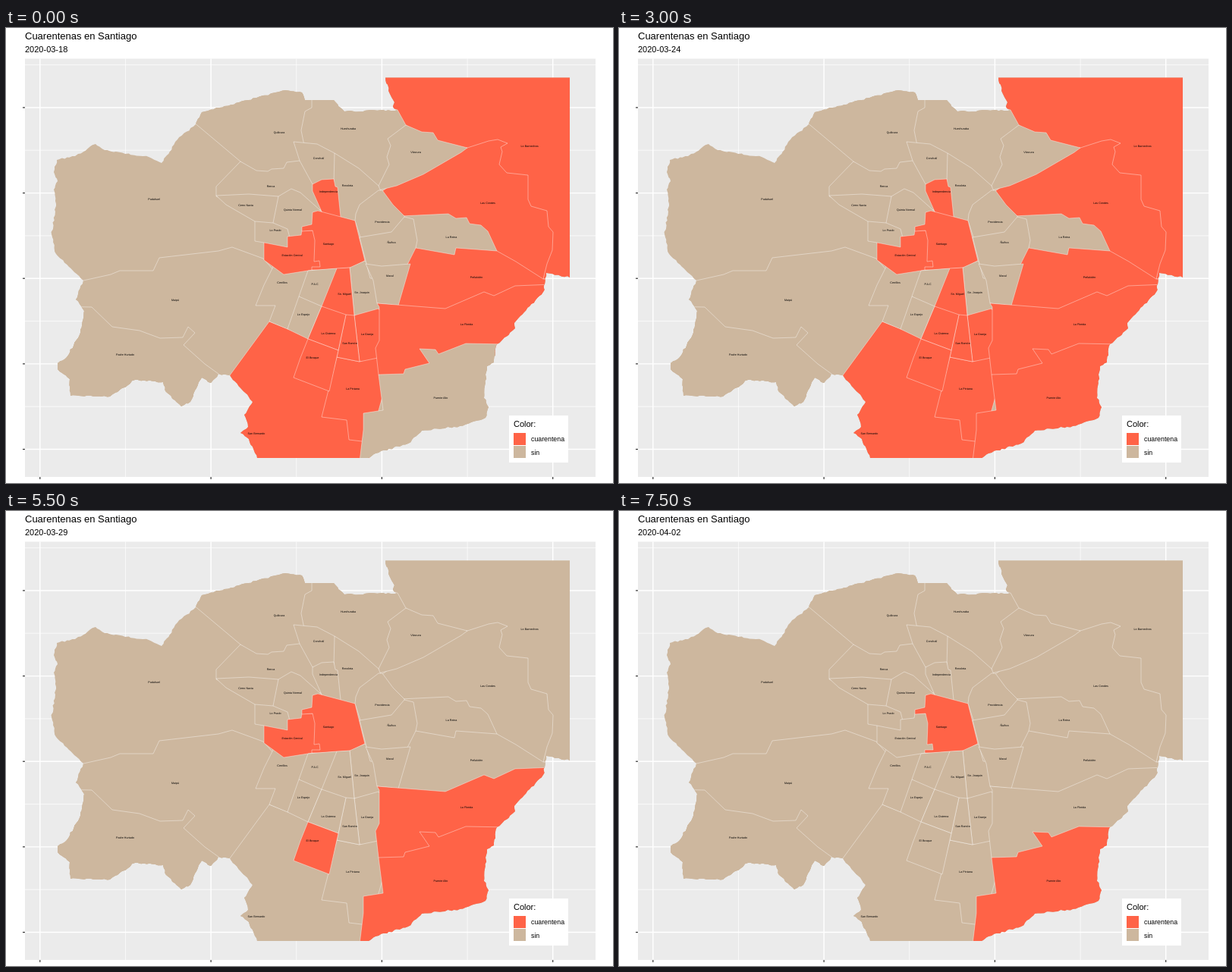
Recreate the animation shown at these times as an HTML page. Size 800 by 600 pixels, loop 8000 ms.

```html
<!DOCTYPE html>
<html lang="es">
<head>
<meta charset="utf-8">
<title>Cuarentenas en Santiago</title>
<style>
html, body { margin: 0; width: 100%; height: 100%; overflow: hidden; background: #fff; }
svg { display: block; width: 800px; height: 600px; }
text { font-family: "Liberation Sans", Arial, sans-serif; }
#map { clip-path: url(#land); stroke: #fff; stroke-width: .4; }
#labels { font-size: 3.7px; text-anchor: middle; text-rendering: geometricPrecision; }
</style>
</head>
<body>
<svg viewBox="0 0 800 600">
  <clipPath id="land"></clipPath>
  <rect x="25" y="40.5" width="752" height="551.5" fill="#ebebeb"/>
  <g id="grid"></g>
  <g id="map"></g>
  <g id="labels"></g>
  <text x="25" y="15" font-size="13">Cuarentenas en Santiago</text>
  <text id="date" x="25" y="32" font-size="11"></text>
  <rect x="663" y="511" width="78" height="62" fill="#fff"/>
  <text x="669" y="526" font-size="11">Color:</text>
  <rect x="669" y="534" width="16" height="16" fill="#ff6347"/>
  <rect x="669" y="551" width="16" height="16" fill="#cdb79e"/>
  <text x="692" y="545" font-size="8.8">cuarentena</text>
  <text x="692" y="563" font-size="8.8">sin</text>
</svg>
<script>
// Key points of the outer edge; roughen() adds the fine wiggles.
const coast = `250,127 258,111 368,82 390,85 394,95 432,95 446,110 516,108 510,104 512,98 507,89 500,65.5
743,65.5 743,329 712,323 708,348 690,367 670,389 671,396 647,417 643,441 634,446 630,488 636,500 632,514
598,525 548,531 530,548 487,561 478,567 331,567 320,542 309,534 319,526 314,510 325,493 312,478 295,458
280,456 270,468 258,461 243,493 231,499 211,480 207,467 170,464 137,486 85,485 84,463 68,450 68,442
80,434 98,402 103,373 92,358 102,333 66,298 60,272 66,232 63,213 68,202 63,190 67,174 91,169 118,153
130,161 188,170 205,178 226,147`;

// name | label position | phases under quarantine | outline
// Each border is drawn by the later commune; the rest runs loosely beneath neighbours or past the coast.
const communes = `
Pudahuel|195,226||0,0 800,0 800,600 0,600
Maipú|223,359||80,335 102,333 138,325 150,320 194,320 202,303 280,294 298,289 339,304 380,350 380,480 80,480
Padre Hurtado|157,431||50,367 113,368 140,394 176,399 203,409 233,408 240,394 249,402 234,418 262,443 280,456 280,510 50,510
San Bernardo|330,535|AB|295,458 347,387 480,440 480,590 280,590
Quilicura|360,138||240,118 309,176 340,205 390,200 420,150 420,60 240,60
Huechuraba|451,133||392,150 389,135 394,110 403,105 403,80 540,80 540,140 510,215 460,230 400,170
Lo Barnechea|690,156|AB|490,60 760,60 760,331 690,331 600,180 527,128 516,108 500,104
Las Condes|635,231|AB|608,158 636,149 648,147 661,152 652,157 654,163 650,180 660,191 688,194 688,226 692,235 713,241 715,262 721,269 720,293 713,311 708,331 700,350 520,300 495,230 496,215 560,170
Vitacura|540,164||527,128 548,137 563,138 569,148 608,158 600,164 550,193 515,208 491,214 491,208 505,180 502,170 507,155 503,146
La Reina|587,276||520,248 583,245 593,251 607,250 611,258 626,260 635,268 647,294 640,310 520,310
Peñalolén|620,329|AB|540,290 591,299 593,290 647,294 672,308 708,331 720,331 720,360 600,390 510,385 515,300
Recoleta|450,208||433,165 465,185 491,208 500,230 470,260 430,260 420,190
Providencia|496,256||491,214 496,214 510,233 525,248 530,280 470,285 460,254 461,245 466,233
Renca|349,209||309,176 330,188 345,189 350,186 366,185 370,177 387,175 420,190 420,240 300,232 277,222 277,209
Conchalí|412,172||379,150 410,153 433,165 432,205 404,206 387,175
Cerro Navia|316,234||277,221 320,219 359,222 370,260 340,270 328,255 290,233
Quinta Normal|378,240||359,222 376,212 388,217 416,242 425,260 390,290 360,275 352,257
Lo Prado|355,267||328,255 352,257 371,265 380,300 350,300 340,283 328,281
Independencia|425,216|AB|404,206 416,200 432,199 434,209 437,210 441,249 430,260 416,242 404,215
Cerrillos|364,336||350,311 352,315 340,339 329,366 355,366 347,387 371,397 410,380 410,310 370,310
Estación Central|377,300|ABC|340,283 371,289 371,275 389,273 390,267 420,267 420,318 404,319 366,325 340,306
Santiago|425,285|ABCD|390,262 403,259 404,243 411,241 460,254 473,307 455,316 414,319 403,319 403,315 414,315 413,307 406,308 407,280 404,267 390,268
P.A.C|407,338||398,320 436,317 440,360 410,375 386,354
Lo Espejo|392,378||386,354 416,367 398,410 371,397
Sn. Joaquin|469,349||453,316 473,307 500,340 500,385 459,379
Sn. Miguel|446,351|AB|436,317 453,316 459,379 440,390 416,367
Ñuñoa|508,283||466,276 508,269 525,249 537,252 542,280 540,290 520,330 480,330
Macul|506,327||474,311 495,314 533,311 517,366 489,363 484,333
La Granja|476,404|AB|459,379 491,370 510,400 510,440 466,440
La Pintana|457,476|AB|436,434 466,440 490,435 510,435 480,545 469,545 452,543 449,517 416,513
La Florida|607,391|ABC|489,363 579,370 630,348 643,353 671,340 720,338 720,420 600,440 510,480 491,457 487,422 492,412 492,368
San Ramón|453,416|AB|448,378 459,379 466,440 436,434 438,425
La Cisterna|425,403|AB|416,367 448,378 438,425 398,410
El Bosque|404,435|ABC|398,410 438,425 426,479 379,461 388,435
Puente Alto|573,488|BCD|491,457 524,456 526,450 558,442 545,423 566,424 570,430 606,416 660,417 660,580 465,580 471,530 471,508 497,504`
  .trim().split("\n").map(row => row.split("|"));

const byId = id => document.getElementById(id);

function add(parent, tag, attrs, text = "") {
  const node = document.createElementNS("http://www.w3.org/2000/svg", tag);
  for (const key in attrs) node.setAttribute(key, attrs[key]);
  node.textContent = text;
  return byId(parent).appendChild(node);
}

let seed = 7;
const jitter = () => (seed = seed * 16807 % 2147483647) / 2147483647 * 2 - 1;

// Splits slanted edges into short steps with small random offsets.
function roughen(text) {
  const points = text.split(/\s+/).map(p => p.split(",").map(Number));
  return points.flatMap(([x, y], i) => {
    const [x2, y2] = points[(i + 1) % points.length];
    const straight = x === x2 || y === y2;
    const steps = straight ? 1 : Math.ceil(Math.hypot(x2 - x, y2 - y) / 4);
    return Array.from({ length: steps }, (_, k) => k
      ? [x + (x2 - x) * k / steps + jitter(), y + (y2 - y) * k / steps + jitter()]
      : [x, y]);
  }).join(" ");
}

const line = (d, color, width) => add("grid", "path", { d, stroke: color, "stroke-width": width });
const STEP = 112.65;
for (let i = 0; i < 7; i++) {
  const x = 44.8 + i * STEP;
  line(`M${x} 40.5V592`, "#fff", i % 2 ? .7 : 1.4);
  if (i % 2 == 0) line(`M${x} 592v3`, "#333", 1.2);
}
for (let i = 0; i < 10; i++) {
  const y = 48.6 + i * STEP / 2;
  line(`M25 ${y}H777`, "#fff", i % 2 ? 1.4 : .7);
  if (i % 2) line(`M22 ${y}h3`, "#333", 1.2);
}

add("land", "polygon", { points: roughen(coast) });
const areas = communes.map(([name, at, phases, points]) => {
  const [x, y] = at.split(",").map(Number);
  add("labels", "text", { x, y: y + 1.2 }, name);
  return { phases, node: add("map", "polygon", { points }) };
});

let shown = -1;
function draw(now) {
  const day = Math.floor(now % 8000 / 500);
  if (day !== shown) {
    shown = day;
    const phase = day < 4 ? "A" : day < 9 ? "B" : day < 12 ? "C" : "D";
    for (const { node, phases } of areas)
      node.setAttribute("fill", phases.includes(phase) ? "#ff6347" : "#cdb79e");
    byId("date").textContent = new Date(Date.UTC(2020, 2, 18 + day)).toISOString().slice(0, 10);
  }
  requestAnimationFrame(draw);
}
draw(performance.now());
</script>
</body>
</html>
```
